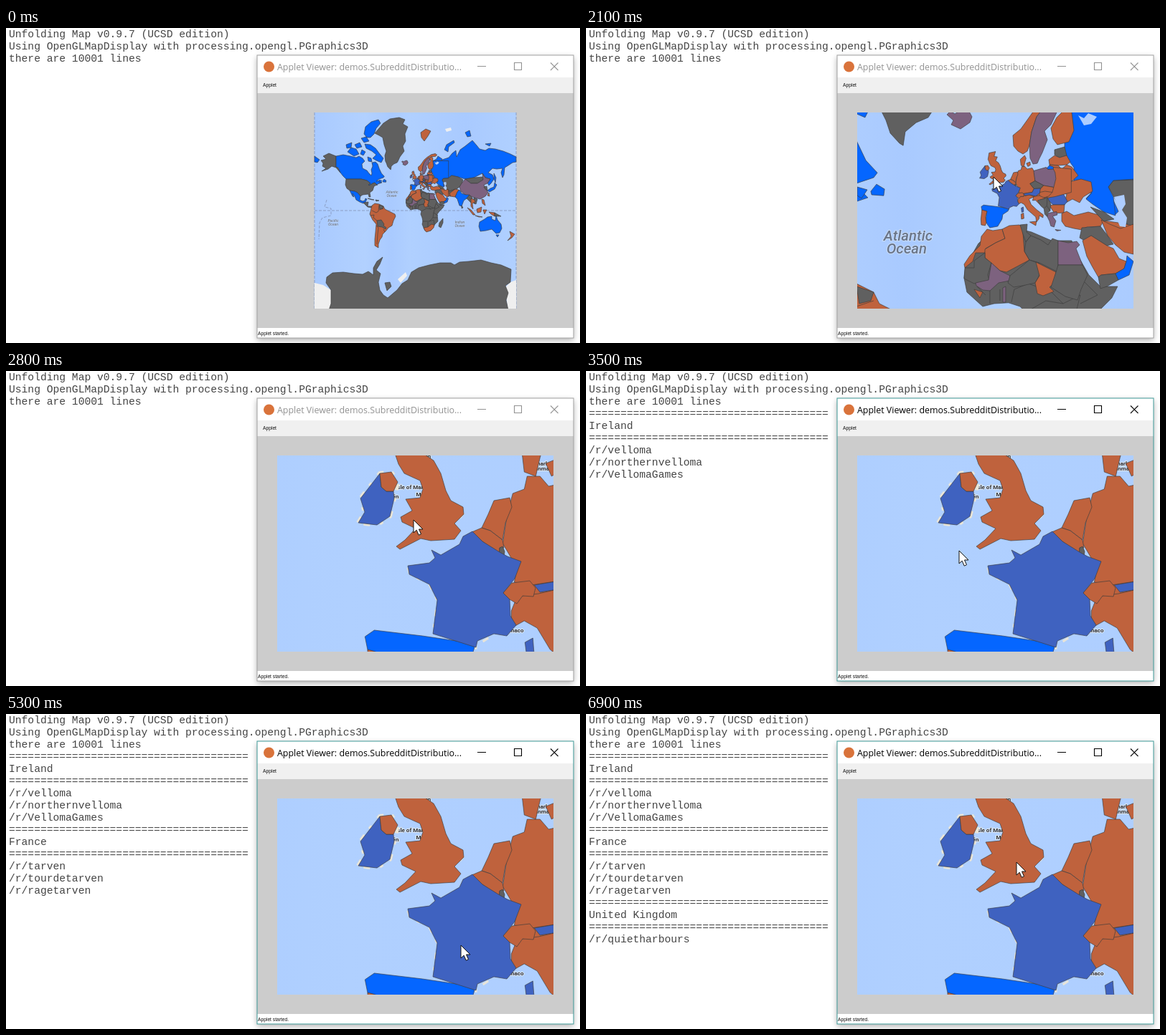
These frames come from a looping animation (800 px wide and 440 px high, 7 s). An HTML page:

```html
<!DOCTYPE html>
<html lang="en">
<head>
<meta charset="utf-8">
<title>Map applet</title>
<style>
html,body{margin:0;width:100%;height:100%;overflow:hidden;background:#fff}
svg{display:block;width:800px;height:440px}
#console{font:14.65px "Liberation Mono",monospace;fill:#444;white-space:pre}
.land path{stroke:#3c3c3c;stroke-width:.65;stroke-linejoin:round;vector-effect:non-scaling-stroke}
.g{fill:#606060}.o{fill:#bf623d}.p{fill:#7d627f}.b{fill:#0566ff}.m{fill:#3f62c0}
.land .water{fill:#aecdff;stroke:none}
.ui{font:6.7px "Liberation Sans",sans-serif;fill:#111}
.sea{font:italic 500 5.1px Roboto,sans-serif;fill:#6b7688;text-anchor:middle;paint-order:stroke;stroke:#c9ddfc;stroke-width:.5}
.near{font:bold 10.5px Roboto,sans-serif;fill:#333;text-anchor:middle;paint-order:stroke;stroke:#dce8fb;stroke-width:2}
.close{font-size:8px}
.dash{fill:none;stroke:#7d8bad;stroke-width:.7;stroke-dasharray:4 2}
.ice{fill:#efefef}
.land .coast path{fill:none;stroke:#e9e5d8;stroke-width:6;stroke-dasharray:9 11 5 14}
.land .coast .thin{stroke-width:3}
</style>
</head>
<body>
<svg viewBox="0 0 800 440">
<defs>
<clipPath id="port"><rect x="378" y="118" width="385" height="274"/></clipPath>
<linearGradient id="water"><stop offset="0" stop-color="#a9caff"/><stop offset=".25" stop-color="#b2d1ff"/><stop offset=".38" stop-color="#a9caff"/><stop offset=".47" stop-color="#b0d0ff"/><stop offset=".75" stop-color="#a9caff"/><stop offset="1" stop-color="#b0d0ff"/></linearGradient>
<filter id="soft" x="-5%" y="-5%" width="110%" height="112%"><feGaussianBlur stdDeviation="4"/></filter>
</defs>
<rect width="800" height="440" fill="#fff"/>
<g id="console"></g>

<rect x="350" y="41" width="441" height="395" fill="#000" opacity=".32" filter="url(#soft)"/>
<rect x="350" y="38" width="441" height="395" fill="#fff"/>
<rect x="350" y="69" width="441" height="22" fill="#f0f0f0"/>
<rect x="350" y="91" width="441" height="328" fill="#ccc"/>
<rect id="frame" x="350" y="38" width="441" height="395" fill="none"/>
<circle cx="366.5" cy="54" r="7.5" fill="#d9733b"/>
<g id="bar">
<text x="378" y="59" style="font:12.45px 'Open Sans',sans-serif">Applet Viewer: demos.SubredditDistributio...</text>
<path d="M657 53.5H669M708.5 48.5H718.5V58.5H708.5ZM759 48.5L769.5 59M769.5 48.5L759 59" fill="none" stroke="currentColor" stroke-width="1.1"/>
</g>
<text class="ui" x="358" y="82">Applet</text>
<text class="ui" x="351" y="428.5">Applet started.</text>

<g clip-path="url(#port)">
<g class="world">
<rect x="429.7" y="114" width="281.6" height="282" fill="url(#water)"/>
<g id="far">
<path class="dash" d="M430 255H711M430 118V392M711 118V392M447 240L444 250 453 252 453 262 441 265 437 272 436 295"/>
<path class="ice" d="M430 356L442 359 453 366V392H430ZM711 352L703 355 696 362 699 392H711ZM510 348L517 346 518 354 512 356ZM546 351L557 341 559 346 550 356ZM612 141L620 139 621 143 614 145Z"/>
</g>
<g id="sea" class="sea"><text x="538" y="231">Atlantic</text><text x="537.5" y="235.5">Ocean</text><text x="456" y="271">Pacific</text><text x="456" y="275.5">Ocean</text><text x="632.5" y="273">Indian</text><text x="632.5" y="277.5">Ocean</text></g>
</g>

<g id="mid" class="near"><text x="533" y="195">Ireland</text><text x="534" y="207">Éire</text><text x="590" y="177">United</text><text x="589" y="188">Kingdom</text><text x="656" y="165" font-size="9">Denmark</text><text x="656" y="175" font-size="9">Danmark</text><text x="669" y="289">Italia</text><text x="389" y="369" style="font:italic bold 27px Roboto,sans-serif" fill="#7b8390">c</text></g>
<g id="near" class="near close"><text x="563" y="165">Isle of Man</text><text x="536" y="178">Dublin</text><text x="593" y="175">Manchester</text><text x="574" y="122">Edinburgh</text><text x="707" y="365">Monaco</text><text x="740" y="132">Denmark</text><text x="748" y="139">Danmark</text></g>

<g class="world land">
<!-- whole world -->
<path class="g" d="M447 348L455 342 470 341 485 343 497 344 505 340 512 345 512 335 517 326 525 320 521 330 516 338 522 343 519 355 521 366 526 373 532 377 545 366 552 357 560 352 565 341 575 335 590 331 605 328 620 328 625 331 632 327 645 326 662 324 676 328 690 331 704 337 703 355 696 360 700 370 697 380 700 394H450L453 385 453 366 446 356ZM528 356L535 355 537 361 531 367Z"/>
<path class="g" d="M514 147L520 140 526 133 535 127 548 125 556 128 553 134 560 138 556 148 557 158 553 165 555 172 549 180 546.3 186 545 188 540.8 189.8 537 193 536.3 197.8 535 197 531.8 193.5 530.3 189 528.8 186 528 178 530 172 527 163 525 153 520 150Z"/>
<path class="g" d="M460 179L450 175 442 179 446 183 439 185 442 189 441 193 446 196 440 200 449 197 454 193 460 195 466 202 462 195 460 194Z"/>
<path class="b" d="M460 179L470 177 480 179 488 181 492 179 497 182 500 186 496 190 497 196 503 199 506 203 509 206 510 203 509 198 511 193 510 188 515 187 518 190 520.3 196.7 523.3 203 527.3 207.3 526 209 520 211 516 214 521 213 524 216 518 218 517 220 514 216 511 217 506 220 505 219 508 217 503 213 495 211H474L470 207 466 202 463 195 460 194ZM525.3 215L525 213.8 527 211.3 529.8 213 529.5 215.3ZM476 173L481 167 488 169 492 176 485 179ZM474 163L482 160 481 167 475 168ZM486 163L493 160 496 166 489 168ZM495 154L502 152 506 158 499 160ZM499 148L501 138 509 131 519 128 522 133 516 140 513 148 508 153 503 153ZM500 162L508 163 515 168 521 176 526 182 523 188 516 185 511 182 516 177 510 172 502 168ZM496 170L501 173 498 178 494 176ZM504 180L509 182 510 187 505 186Z"/>
<path class="g" d="M474 211H495L503 213 508 217 505 219 506 220 511 217 514 216 517 219 513 221 511 227 507 230 508 236 506 236 505 232 497 233 494 235 490 230 486 228 479 227 475 224 473 219Z"/>
<path class="b" d="M479 227L486 228 490 230 494 235 493 240 497 242 500 241 501 238 503 239 501 243 498 245 493 243 488 240 486 235 483 231 485 236 483 235Z"/>
<path class="g" d="M498 244L505 243 504 249 510 249 509 251 504 250ZM504 238L513 240 510 240ZM515 240L520 241 516 242Z"/>
<path class="o" d="M510 248L514 245 520 246 526 249 528 253 536 257 542 260 543 263 540 269 538 276 533 279 529 284 525 288 524 292 521 296 519 302 519 307 514 304 514 295 515 285 516 274 511 268 507 260Z"/>
<path class="g" d="M520 247L526 249 525 252 521 253ZM517 269L523 268 527 274 526 276 530 279 529 281 524 278 518 277Z"/>
<path fill="none" d="M510 255L516 258 519 256 520 248M508 262L513 261 512 265 517 269M516 276L519 279 518 288 517 302M526 281L528 285M520 254L526 252"/>
<path class="b" d="M594.5 186L600 183 602 179 608 183 604 188 608 184 617 181 622 175 627 171 628 180 633 170 640 165 650 157 656 164 660 169 668 171 673 168 682 169 693 172 703 176 711 180V187L706 188 700 192 695 195 694 205 692 209 690 202 692 196 684 197 678 196 672 202 678 205 680 211 676 217 673 220 671 216 675 211 668 209 664 203 658 206 652 209 640 211 630 208 621 206 616.5 209.8 609.5 210 607.8 212.3 609 215.8 611.3 220.8 610.3 221.8 603.8 218.5 600 216.3 602.3 213.8 601.5 209.8 598.3 206.8 596.8 204.3 594.3 201.3 595 198 594 191ZM430 179L437 184 434 188 430 187ZM611 170L614 163 624 157 625 160 617 166 616 173ZM640 146L646 143 648 151 643 152ZM680 203L683 209 682 216 680 210ZM668 162L676 161 674 165Z"/>
<path class="o" d="M578 146L585 141 592 144 588 151 583 158 579 153Z"/>
<path class="b" d="M671 227L675 224 680 222 681 216 684 219 681 225 674 229Z"/>
<path class="g" d="M607.8 212.3L609.5 210 616.5 209.8 621 206 630 208 637 212 635 218 632 222 628 225 618 228 614 225 611 218ZM640 211L652 209 664 208 665 212 657 217 648 217Z"/>
<path class="p" d="M632 222L635 217 640 211 648 217 657 217 665 212 664 203 668 209 675 211 671 217 666 219 668 223 672 230 668 235 661 239 653 237 648 235 640 233 634 228Z"/>
<path class="g" d="M614 225L618 228 626 225 626 230 618 232Z"/>
<path class="o" d="M606 224L613 225 617 226 619 235 613 234 608 229ZM618 231L626 225 631 226 628 232 626 236 619 235Z"/>
<path class="b" d="M626 236L629 229 632 226 635 231 641 233 646 233 642 238 638 241 635 249 632 248 629 239Z"/>
<path class="g" d="M646 233L650 237 649 245 645 241 642 238ZM652 237L657 239 655 246 652 245ZM666 222L670 221 671 227 668 225Z"/>
<path class="o" d="M648 238L653 240 654 243 650 245 651 253 648 249ZM643 251L648 254 654 261 651 261ZM654 262L664 264 659 264ZM656 253L663 250 662 257 657 258ZM665 254L670 254 667 260ZM673 257L681 258 681 263 676 260ZM663 239L666 240 668 248 664 245ZM673 230L674 235 671 234ZM702 284L709 288 705 293 699 297 704 291Z"/>
<path class="g" d="M681 258L690 263 685 263 681 263ZM635 248L637 251 635 252ZM604 272L609 266 609 272 606 279 603 277Z"/>
<path class="b" d="M659 277L660 271 667 267 671 264 677 263 677 267 682 269 683 262 685 268 690 274 691 280 688 286 683 287 680 284 677 281 669 283 661 284ZM683 289L687 289 685 292Z"/>
<path class="g" d="M557.5 244L558.5 249 564 254 568 253 573 252.7 577 254 579 256 578 260 580 265 581 270 580 274 582 279 584 283 592 283 598 274 602 270 601 260 604 256 609 251 611 247 605 247 601 243 597 236 595 231 588 231 581 228 577 227 567 228 562.5 232 558 240Z"/>
<path class="o" d="M582 279L588 278 593 274 597 275 596 279 592 283 586 285 584 283Z"/>
<path fill="none" d="M579 256L586 252 592 253 598 250 596 258 595 265 590 270 580 270M596 258L602 262M590 270L596 268 597 274M595 265L601 265M588 278V271M574 252.5L575 248 580 246 588 249 592 253M597 243L604 250 598 253M570 252V248M565 250L562 247M566.5 253V248"/>
<path class="o" d="M561 248L564 249 563 251Z"/><path class="p" d="M571 247.5L572 247 572 252.5 571 252.5Z"/>

<!-- Africa, Middle East and the North -->
<g transform="matrix(.25 0 0 .25 425.775 156.75)">
<path class="b" d="M378 222L392 226 384 238 378 234ZM676 115L672 140 667 160 667 172 672 184 680 195 680 215 700 230 705 230 697 239 706 246 722 257 738 262 735 236 728 222 735 213 764 211V115Z"/>
<path class="water" d="M686 122L694 126 700 119 712 124 704 134 694 136Z"/>
<path class="p" d="M503 121L508 116 514 120 522 115 532 113 538 124 535 132 522 141 509 135 512 129Z"/>
<path class="o" d="M596 165L595 150 606 141 616 127 628 110 645 95 668 80 690 75 700 82 692 90 672 92 655 98 640 110 628 124 621 145 618 164 615 172 609 176 602 172Z"/>
<path class="p" d="M618 164L621 145 628 124 640 108 652 98 662 105 656 118 648 135 639 144 643 156 636 174 632 182 629 189 623 190 619 182Z"/>
<path class="o" d="M651 155L648 140 656 125 665 116 658 102 668 92 676 98 677 118 680 143 673 159 657 163Z"/>
<path class="g" d="M653 170L667 166 670 178 660 181 653 177Z"/>
<path class="o" d="M645 184L653 178 660 181 670 178 675 187 670 191 658 192 646 191Z"/>
<path class="o" d="M646 191L658 192 663 197 655 205 646 199Z"/>
<path class="o" d="M655 205L663 197 670 191 677 194 686 206 677 214 656 213Z"/>
<path class="o" d="M652 228L656 213 677 214 690 211 704 215 706 228 693 236 688 244 678 239 667 245 670 232 658 230Z"/>
<path class="m" d="M643 239L653 230 665 231 671 242 667 247 651 247Z"/>
<path class="o" d="M646 248L651 247 667 247 666 258 653 259Z"/>
<path class="o" d="M663 259L670 256 680 262 700 257 714 261 721 270 717 277 698 278 691 282 680 280 668 277 663 270Z"/>
<path class="g" d="M703 250L722 257 736 267 722 270 714 262Z"/>
<path class="g" d="M691 279L717 277 727 290 735 302 726 304 704 290 693 296 688 293Z"/>
<path class="o" d="M718 268L730 274 745 280 763 274V316L750 313 738 303 727 290Z"/>
<path class="water" d="M736 236L750 233 752 246 747 254 754 265 752 278 744 277 738 262 744 256Z"/>
<path class="o" d="M692 297L704 290 726 304 735 308 743 322 753 326 750 336 738 343 718 345 714 348 706 334 698 319Z"/>
<path class="g" d="M714 348L718 345 738 343 742 352 726 361 717 364Z"/>
<path class="b" d="M754 318L763 326 757 345 742 352 738 343 750 336 753 326Z"/>
<path class="o" d="M559 281L567 283 580 281 584 294 571 300 557 308 556 314 543 314 539 326 528 335 527 330 535 318 549 304 551 291Z"/>
<path class="o" d="M580 281L590 276 604 275 608 278 609 287 611 312 618 324 586 341 577 339 556 321V309L571 300 584 294Z"/>
<path class="g" d="M605 275L615 274 614 285 620 290 613 299 609 288Z"/>
<path class="g" d="M613 299L620 290 634 296 644 303 650 294 658 297V341L632 328 618 324 611 312Z"/>
<path class="p" d="M658 297L672 300 684 298 688 303 683 308 692 331H658Z"/>
<path class="g" d="M528 335H541V325L556 314V321L565 328 560 345 562 353 541 357 527 350Z"/>
<path class="p" d="M565 328L577 339 591 346 590 353 575 356 563 367 553 366 544 360 543 356 561 352Z"/>
<path class="g" d="M591 346L618 324 632 329V345L626 356 608 360 596 362 588 356Z"/>
<path class="o" d="M627 327L655 341 652 357 646 362 652 368 637 374 629 371 626 356 632 346Z"/>
<path class="g" d="M655 341L658 331H692L699 345 690 365 685 380 668 375 648 362Z"/>
</g>

<!-- Central and southern Europe -->
<g transform="matrix(.125 0 0 .125 496.738 182.875)">
<path class="o" d="M640 262L650 225 684 200 735 180 785 185V250L740 262 705 268 680 264Z"/>
<path class="b" d="M534 290L540.5 285.5 574 289.5 611 295 609 302 594 312 592 325 580 345 558 349 552 341 546 330 550 303 536 300Z"/>
<path class="o" d="M536 299L550 303 546 318 548 335 545 343 534 341 533 325Z"/>
<path class="o" d="M637 190L645 187 647 178 656 178 662 185 676 182 682 192 684 218 670 226 681 240 676 250 650 254 638 252 640 242 630 225 633 205Z"/>
<path class="o" d="M645 175L643 158 655 147 659 155 656 165 653 178ZM660 169L670 165 671 174 664 178Z"/>
<path class="b" d="M716 183L724 175 735 179 735 186 720 186Z"/>
<path class="p" d="M680 190L715 180 720 186 735 185 740 195 742 212 736 236 708 231 684 218Z"/>
<path class="g" d="M670 226L684 218 708 231 699 239 681 240Z"/>
<path class="o" d="M697 243L708 231 736 236 732 250 722 261 705 266 696 259Z"/>
<path class="o" d="M636 272L640 262 655 260 668 257 682 262 667 269 673 284 689 299 707 313 706 321 696 315 695 324 688 333 686 319 676 310 663 299 654 284 645 279 636 284Z"/>
<path class="o" d="M669 333L688 331 686 343ZM645 311L652 308 653 323 646 325Z"/>
<path class="m" d="M645.5 294L651 291 652 304 647 306Z"/>
<path class="m" d="M652 254L676 250 681 240 699 239 697 252 686 261 668 257 656 259Z"/>
<path class="o" d="M680 262L696 259 713 267 692 273 708 289 699 286 685 272 677 273Z"/>
<path class="g" d="M691 273L708 268 718 264 728 282 726 302 719 307 718 318 711 311 709 296 700 288Z"/>
<path class="p" d="M718 318L721 308 744 304 746 313 733 317 742 330 737 347 728 344 724 330ZM740 354L756 356 745 358Z"/>
<path fill="none" d="M697 250L712 247 732 250M709 295L717 288 718 264M717 288L726 302"/>
</g>

<!-- Western Europe -->
<g transform="matrix(.0625 0 0 .0625 532.22 195.94)">
<g id="coast" class="coast"><path d="M491 212L500 197 494 178 521 143 537 141 546 155 541 178 535 203 517 215Z"/><path class="thin" d="M560 275L563 284 590 298 601 320 595 367M708 358L680 368 655 384V391M638 198L626 214"/></g>
<path class="o" d="M543 118L538 107 544 71 580 63 572 91 590 93 581 115 596 125 606 143 613 167 620 181 637 190 638 200 625 213 634 223 625 235 592 237 578 234 549 249 544 245 556 236 571 220 552 211 550 204 566 195 557 179 577 177 581 165 577 153 568 149 555 143 547 130Z"/>
<path class="m" d="M491 212L500 197 494 178 521 143 523 162 530 168 540 168 541 178 535 203 517 215Z"/>
<path class="o" d="M521 143L537 141 546 155 540 168 530 168 523 162Z"/>
<path class="o" d="M663 219L672 200 680 181 702 177 705 190 696 212 692 236 675 223Z"/>
<path class="o" d="M649 225L663 219 675 223 692 236 694 247 688 247 688 257 664 238Z"/>
<path class="g" d="M688 247L692 245 695 252 694 260 687 258Z"/>
<path class="m" d="M560 272L590 268 598 261 593 250 606 257 632 242 637 231 650 224 664 238 688 253 699 259 718 266 709 290 693 310 702 318 703 342 711 355 698 370 680 367 657 377 655 386 595 367 601 320 590 298 562 284Z"/>
<path class="o" d="M693 310L705 296 730 293 738 303 735 315 720 314 712 325 702 319Z"/>
</g>
</g>
</g>
<path id="cursor" d="M0 0V18L4.2 14.2 7.2 21.2 10.5 19.7 7.5 13H13Z" fill="#fff" stroke="#111" stroke-width="1" stroke-linejoin="round"/>
</svg>
<script>
const $ = id => document.getElementById(id);
const LOOP = 7000, CX = 567.7, CY = 209;
const rule = '='.repeat(38);

const blocks = [
  [0, 'Unfolding Map v0.9.7 (UCSD edition)', 'Using OpenGLMapDisplay with processing.opengl.PGraphics3D', 'there are 10001 lines'],
  [3300, rule, 'Ireland', rule, '/r/velloma', '/r/northernvelloma', '/r/VellomaGames'],
  [5000, rule, 'France', rule, '/r/tarven', '/r/tourdetarven', '/r/ragetarven'],
  [6600, rule, 'United Kingdom', rule, '/r/quietharbours']
];
const zooms = [[0, 1], [1700, 2], [2000, 4], [2400, 8], [2800, 16]];
const path = [
  [900, 688, 22], [1200, 547, 188], [1500, 568, 208], [2800, 568, 208],
  [3100, 517, 188], [3300, 517, 192], [3500, 520, 251], [4600, 634, 323],
  [5600, 634, 323], [6400, 600, 207], [LOOP, 600, 207]
];

// Console lines, one group per printed block
let row = 0;
const groups = blocks.map(([start, ...lines]) => {
  const g = document.createElementNS('http://www.w3.org/2000/svg', 'g');
  for (const line of lines) {
    const t = document.createElementNS(g.namespaceURI, 'text');
    t.setAttribute('x', 4);
    t.setAttribute('y', 12.5 + 17 * row++);
    t.textContent = line;
    g.append(t);
  }
  $('console').append(g);
  return { g, start };
});

const show = (el, on) => el.setAttribute('visibility', on ? 'visible' : 'hidden');

function cursorAt(t) {
  const i = Math.max(1, path.findIndex(p => p[0] >= t));
  const [t0, x0, y0] = path[i - 1], [t1, x1, y1] = path[i];
  const u = Math.min(1, Math.max(0, (t - t0) / (t1 - t0)));
  const k = u * u * (3 - 2 * u);
  return [x0 + (x1 - x0) * k, y0 + (y1 - y0) * k];
}

function draw(time) {
  const t = Math.floor(time % LOOP / 100) * 100;
  const z = zooms.filter(s => s[0] <= t).pop()[1];
  const move = `translate(${CX * (1 - z)} ${CY * (1 - z)}) scale(${z})`;
  document.querySelectorAll('.world').forEach(w => w.setAttribute('transform', move));
  show($('far'), z < 4);
  show($('sea'), z < 8);
  show($('mid'), z === 8);
  show($('near'), z === 16);
  show($('coast'), z === 16);

  const active = t >= 3100;
  $('frame').setAttribute('stroke', active ? '#3f9a98' : '#a2a2a2');
  $('bar').style.color = $('bar').style.fill = active ? '#000' : '#929292';
  groups.forEach(b => show(b.g, t >= b.start));

  show($('cursor'), t >= 900);
  $('cursor').setAttribute('transform', `translate(${cursorAt(t)})`);
}

const begin = performance.now();
(function tick() {
  draw(performance.now() - begin);
  requestAnimationFrame(tick);
})();
</script>
</body>
</html>
```
